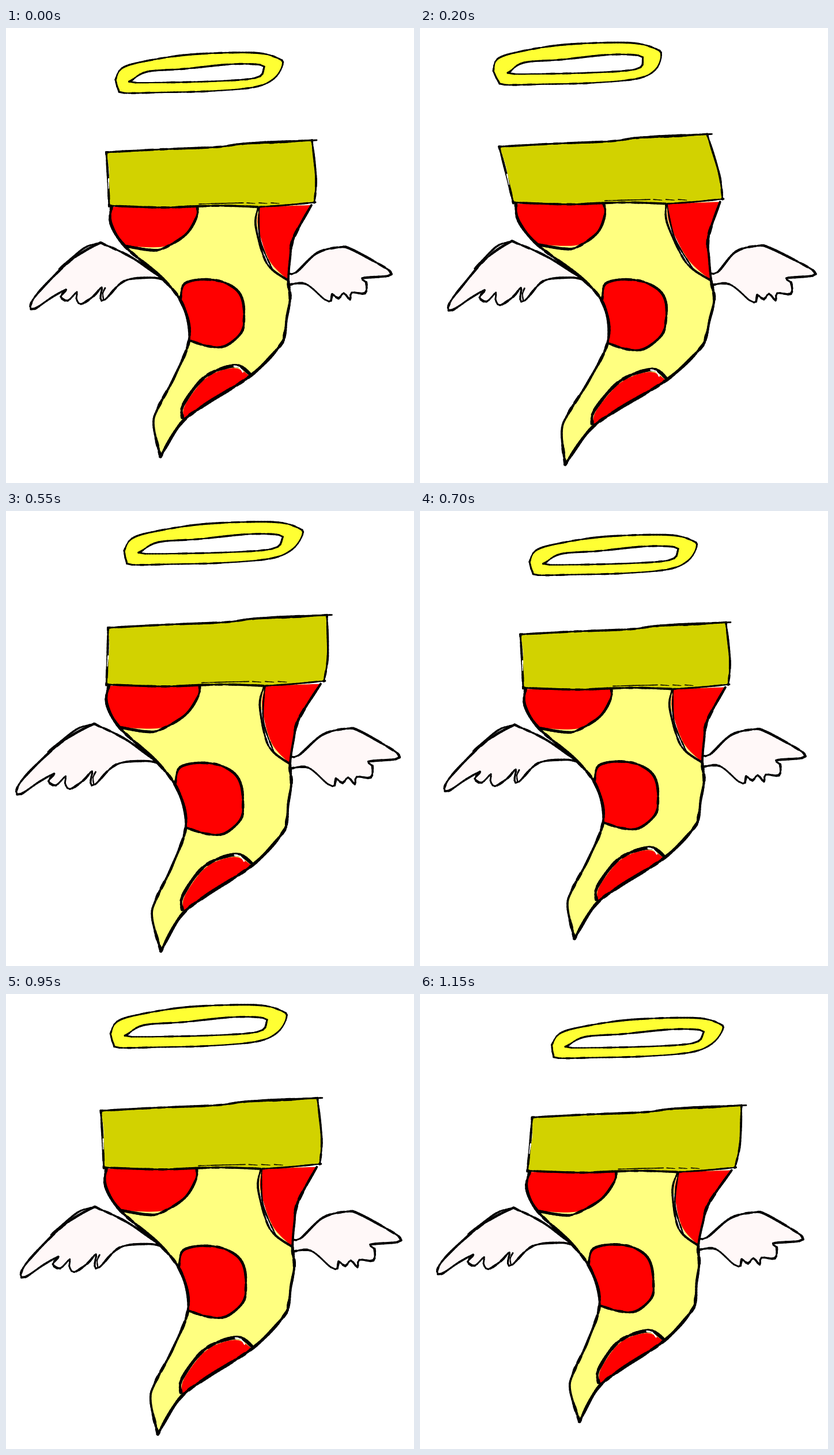
An HTML page with a canvas for the animation above (1200 ms loop, 708x791 px).

```html
<!DOCTYPE html>
<html lang="en">
<head>
<meta charset="utf-8">
<title>Winged pizza</title>
<style>
html, body { margin: 0; width: 100%; height: 100%; overflow: hidden; background: #fff; }
canvas { display: block; width: 708px; height: 791px; }
</style>
</head>
<body>
<canvas id="stage" width="708" height="791"></canvas>
<script>
(() => {
const ctx = document.getElementById('stage').getContext('2d');
const LOOP = 1200, STEP = 50, BEAT = 400, CX = 354, CY = 400;

// The body sways in half sine swings: start, length, strength
const SWINGS = [[0, 400, 1], [400, 300, -.42], [700, 250, .65], [950, 350, -.7]];

function pose(time) {
  const [from, span, force] = SWINGS.findLast(s => time >= s[0]);
  const bend = force * Math.sin(Math.PI * (time - from) / span);
  const rise = Math.min(1, time / 100);
  const pulse = rise * (.031 + .034 * Math.cos(2 * Math.PI * (time - 125) / BEAT));
  return { bend, sx: 1 + .85 * pulse - .014 * bend, sy: 1 + pulse, lift: 1.6 * rise };
}

// Sideways push of a full bend: a soft knee at wing height
function push(y) {
  const d = y - 460;
  return 19 + .0475 * d - .1625 * Math.hypot(d, 30);
}

// Rounds a few points into a fine line
function spline(text) {
  const p = text.trim().split(/\s+/).map(s => s.split(',').map(Number));
  const at = k => p[Math.min(Math.max(k, 0), p.length - 1)];
  const out = [];
  for (let i = 0; i < p.length - 1; i++) {
    const [a, b, c, d] = [at(i - 1), at(i), at(i + 1), at(i + 2)];
    const n = Math.max(2, Math.ceil(Math.hypot(c[0] - b[0], c[1] - b[1]) / 6));
    for (let j = 0; j < n; j++) {
      const t = j / n;
      out.push([0, 1].map(k => b[k] + .5 * t * (c[k] - a[k]
        + t * (2 * a[k] - 5 * b[k] + 4 * c[k] - d[k]
        + t * (3 * b[k] - a[k] - 3 * c[k] + d[k])))));
    }
  }
  out.push(at(p.length - 1));
  return out;
}

const parts = [];
const fill = (color, ...lines) => parts.push({ color, line: lines.flatMap(spline) });
const ink = (w, text, color = '#000') => parts.push({ color, w, line: spline(text) });
const shape = (color, w, text) => { fill(color, text); ink(w, text); };

// halo
shape('#ffff33', 2.8, `190,90 201,70 240,58 321,46 430,43 473,53 480,64 465,88 430,103
  350,110 270,112 205,113 195,107 190,90`);
shape('#fff', 2.8, '218,91 245,76 310,71 390,63 441,64 447,72 432,87 350,93 225,95 218,91');

// wings
shape('#fff8f8', 3.6, `273,437 220,400 172,377 158,376 110,406 56,460 42,484 50,488 80,468
  104,455 95,467 107,474 123,459 122,470 130,480 152,466 166,451 164,470 172,472
  205,440 250,434 273,437`);
ink(3, '158,375 135,383 92,419');
ink(2.4, '172,452 168,461 169,471');
shape('#fff8f8', 3.6, `488,426 503,425 540,391 580,381 600,385 650,412 667,424 663,431 618,435
  625,442 623,461 600,460 597,472 586,461 577,470 566,463 564,474 553,472 520,445 488,447`);

// slice
const left = '183,311 182,340 207,380 272,436 307,482 318,540 293,605 264,660 256,690 268,745';
const right = `268,745 303,688 345,655 425,604 475,553 484,530 487,505 493,470 490,440
  493,400 499,365 530,308`;
fill('#ffff80', left, right);

// pepperoni
const arcLeft = '332,311 331,328 312,359 273,380 207,379';
fill('#f00', '183,311 332,311', arcLeft, '207,379 182,340 183,311');
ink(4, '332,311 331,328 312,359 273,383 250,386 207,379');

fill('#f00', '440,311 530,308', '530,308 499,365 493,400 489,438', '489,438 457,404 437,345 440,311');
ink(4.4, '437,353 448,394 461,418', '#fff');
ink(2.4, '439,311 441,368 462,419');
ink(3.2, '438,311 433,342 447,397 462,420 490,439');

const disc = '303,470 307,448 320,440 345,437 375,441 400,455 411,475 413,505 408,530 380,553 350,553 318,543';
fill('#f00', disc, '318,543 318,515 303,470');
ink(3.8, disc);

fill('#f00', '308,680 311,655 348,608 395,591 422,604', '422,604 385,632 308,680');
ink(5, '306,677 308,654 346,606 398,587 424,602');
ink(2.4, '396,588 405,590 411,598', '#fff');

ink(4.6, left);
ink(4.8, right);

// crust
const rim = '174,216 268,211 365,207 412,201 470,199 531,195';
const side = '531,195 538,262 535,304';
const foot = '535,304 488,307 440,311 380,309 280,311 180,310';
fill('#d2d200', rim, side, foot, '180,310 177,285 179,250 174,216');
ink(3.2, rim);
ink(2.4, '410,202 450,198 539,195');
ink(3.2, side);
ink(3.4, '174,216 177,262 179,310');
ink(1.8, '178,262 178,279', '#fff');
ink(3.3, '179,309 270,312 330,310 380,309 437,311');
ink(1.4, '335,306 370,305 412,304');
for (let x = 418; x < 480; x += 21) ink(1.4, `${x},304 ${x + 14},305`);
ink(2.6, '440,311 485,308 537,303');

function draw(time) {
  const { bend, sx, sy, lift } = pose(time);
  const place = ([x, y]) => [
    CX + (x - CX) * sx + bend * push(y),
    CY + (y - CY) * sy - lift
  ];
  ctx.fillStyle = '#fff';
  ctx.fillRect(0, 0, 708, 791);
  ctx.lineCap = ctx.lineJoin = 'round';
  for (const { color, w, line } of parts) {
    const p = line.map(place);
    if (!w) {
      ctx.fillStyle = color;
      ctx.beginPath();
      p.forEach(q => ctx.lineTo(...q));
      ctx.fill();
      continue;
    }
    ctx.strokeStyle = color;
    for (let i = 1; i < p.length; i++) {
      // uneven pen pressure
      ctx.lineWidth = w * (1 + .22 * Math.sin(i * .8 + 3 * Math.sin(i * .37)));
      ctx.beginPath();
      ctx.moveTo(...p[i - 1]);
      ctx.lineTo(...p[i]);
      ctx.stroke();
    }
  }
}

const start = performance.now();
let shown = -1;
function tick() {
  const time = Math.floor((performance.now() - start) % LOOP / STEP) * STEP;
  if (time !== shown) draw(shown = time);
  requestAnimationFrame(tick);
}
tick();
})();
</script>
</body>
</html>
```
